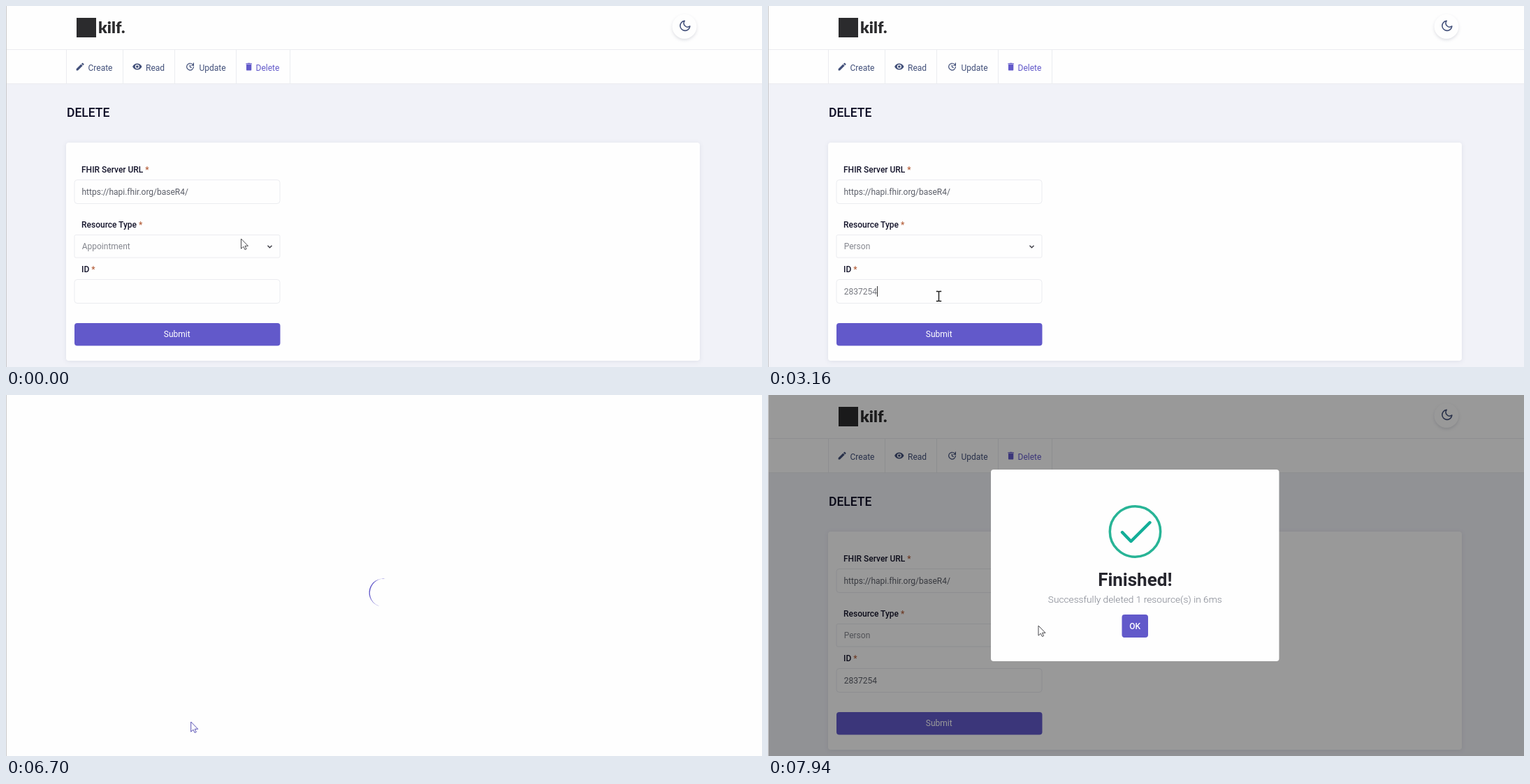
These frames come from a looping animation (1082x518 px, 8 s). An HTML page:

```html
<!DOCTYPE html>
<html lang="en">
<head>
<meta charset="utf-8">
<title>Delete resource</title>
<style>
html, body { margin: 0; width: 100%; height: 100%; overflow: hidden; background: #fefefe; }
svg { display: block; }
text { font: 12px Roboto, sans-serif; white-space: pre; }
.label { font-weight: 500; fill: #14142b; }
.star { fill: #b5603c; }
.value { fill: #5c5f69; }
.line { fill: none; stroke: #ebecf0; }
.field { fill: #fefefe; stroke: #ebecf0; }
.mid { text-anchor: middle; }
.nav { fill: #42507a; }
.accent { fill: #6259ca; }
.soft { filter: drop-shadow(0 1px 3px #2a305018); }
</style>
</head>
<body>
<svg id="stage" width="1082" height="518" viewBox="0 0 1082 518">
  <rect width="1082" height="518" fill="#fefefe"/>
  <rect y="111" width="1082" height="407" fill="#f1f2f8"/>
  <path class="line" d="M0 62.5H1082M0 111.5H1082M86.5 63V111M167.5 63V111M241.5 63V111M329.5 63V111M406.5 63V111"/>

  <rect x="101" y="17" width="28" height="28" fill="#2b2b2d"/>
  <text x="132" y="39" fill="#2b2b2d" style="font:900 23px Lato,sans-serif">kilf.</text>

  <circle cx="971" cy="29.5" r="17.5" fill="#fefefe" style="filter:drop-shadow(0 2px 2px #2a305026)"/>
  <path transform="translate(962.5 19) scale(.78)" fill="none" stroke="#42507a" stroke-width="2" stroke-linejoin="round"
    d="M21 12.79A9 9 0 1 1 11.21 3 7 7 0 0 0 21 12.79z"/>

  <g class="nav">
    <path transform="translate(98.8 79.8) scale(.61)" d="M20.7 7C21.1 6.65 21.1 6 20.7 5.6L18.4 3.3C18 2.9 17.35 2.9 17 3.3L15.1 5.1L18.9 8.9M3 17.25V21H6.75L17.8 9.9L14.1 6.2Z"/>
    <path transform="translate(180.5 79.7) scale(.61)" fill-rule="evenodd" d="M12 9a3 3 0 1 0 0 6a3 3 0 1 0 0-6M12 17a5 5 0 1 1 0-10a5 5 0 1 1 0 10M12 4.5C7 4.5 2.7 7.6 1 12C2.7 16.4 7 19.5 12 19.5C17 19.5 21.3 16.4 23 12C21.3 7.6 17 4.5 12 4.5Z"/>
    <path transform="translate(256.2 79.7) scale(.61)" fill="none" stroke="#42507a" stroke-width="2" d="M20 12.1A8 8 0 1 1 17.6 6.5L20 9V3M20 9.1H14.5M11.8 8V12.6L15.6 14.9"/>
    <text x="117.5" y="93">Create</text>
    <text x="200" y="93">Read</text>
    <text x="276.5" y="93">Update</text>
  </g>
  <g class="accent">
    <path transform="translate(340.3 79.8) scale(.61)" d="M19 4H15.5L14.5 3H9.5L8.5 4H5V6H19M6 19A2 2 0 0 0 8 21H16A2 2 0 0 0 18 19V7H6Z"/>
    <text x="357.5" y="93">Delete</text>
  </g>

  <text x="87" y="159" fill="#0c0c24" style="font-size:17.5px;font-weight:500">DELETE</text>
  <rect class="soft" x="86" y="196" width="907" height="313" rx="4" fill="#fefefe"/>
  <text class="label" x="108" y="239">FHIR Server URL <tspan class="star">*</tspan></text>
  <rect class="field" x="98" y="249.5" width="294" height="34" rx="4"/>
  <text class="value" x="108.5" y="270.5">https://hapi.fhir.org/baseR4/</text>
  <text class="label" x="108" y="318">Resource Type <tspan class="star">*</tspan></text>
  <rect class="field" x="98" y="328.5" width="294" height="32.5" rx="2"/>
  <text id="type" x="108.7" y="349.3"></text>
  <path d="M374.5 343.7l3 3 3-3" fill="none" stroke="#3a3a44" stroke-width="1.4"/>
  <text class="label" x="108" y="382">ID <tspan class="star">*</tspan></text>
  <rect class="field" x="98" y="392.5" width="294" height="34" rx="4"/>
  <text id="code" x="108.7" y="414"></text>
  <rect id="caret" y="402" width="1" height="15" fill="#333"/>
  <rect id="submit" class="accent" x="98" y="455" width="294.5" height="32.5" rx="4"/>
  <text class="mid" x="244.8" y="475" fill="#fff">Submit</text>

  <g id="popup">
    <rect x="97.5" y="24.5" width="295" height="304" fill="#fff" stroke="#c8c8cc" style="filter:drop-shadow(0 1px 2px #0003)"/>
    <svg x="98" y="25" width="294" height="303">
      <rect id="hover" width="284" height="15.15" fill="#1967d2"/>
      <g id="options"></g>
      <rect x="284" width="10" height="303" fill="#f1f1f1"/>
      <rect id="thumb" x="286" width="6" height="168" fill="#c1c1c1"/>
    </svg>
  </g>

  <g id="loading">
    <rect width="1082" height="518" fill="#fefefe"/>
    <path id="spinner" class="accent" d="M0-20A20 20 0 0 0 0 20A18.5 20 0 0 1 0-20Z"/>
  </g>

  <rect id="shade" width="1082" height="518"/>
  <g id="modal">
    <rect x="319" y="107" width="412.5" height="275" rx="4" fill="#fefefe"/>
    <circle cx="525.5" cy="196" r="36.2" fill="none" stroke="#28b496" stroke-width="3.5"/>
    <path id="check" d="M507 197L519.5 210L546.5 183" fill="none" stroke="#12ae98" stroke-width="4.4"
      stroke-linecap="round" stroke-linejoin="round" pathLength="1" stroke-dasharray="1 2"/>
    <text class="mid" x="525.3" y="274.3" fill="#26262e" style="font-size:26px;font-weight:700">Finished!</text>
    <text class="mid" x="525.3" y="297.7" fill="#7d818c" style="font-size:13.7px;font-weight:300">Successfully deleted 1 resource(s) in 6ms</text>
    <rect class="accent" x="506.5" y="315" width="37.5" height="33" rx="4"/>
    <text class="mid" x="525.2" y="336" fill="#fff" style="font-weight:500">OK</text>
  </g>

  <path id="arrow" d="M0 0V14.2L3.3 11.2L5.5 15.6L7.6 14.6L5.5 10.3H10Z" fill="#fefefe"/>
  <path id="beam" d="M-3.7-7H-1Q0-7 0-6Q0-7 1-7H3.7M0-6V6M-3.7 7H-1Q0 7 0 6Q0 7 1 7H3.7" fill="none" stroke="#1a1a1a" stroke-width="1.4"/>
  <rect width="1" height="518" fill="#c9c9cb"/>
</svg>
<script>
const LOOP = 8000, ROW = 15.15;
const el = {};
document.querySelectorAll('[id]').forEach(e => el[e.id] = e);
const set = (id, name, value) => el[id].setAttribute(name, value);
const show = (id, on) => set(id, 'visibility', on ? 'visible' : 'hidden');

const names = ('Appointment Bundle CarePlan CareTeam Claim Communication Composition Condition Consent Contract ' +
  'Coverage Device Encounter Endpoint Flag Goal Group HealthcareService ImagingStudy Immunization Invoice Library ' +
  'List Location Measure Media Medication Observation Organization Patient Person Practitioner Procedure ' +
  'Provenance Questionnaire Schedule').split(' ');
el.options.innerHTML = names.map((n, i) => `<text x="11" y="${i * ROW + 11.7}">${n}</text>`).join('');

const smooth = p => p * p * (3 - 2 * p);
const easeOut = p => 1 - (1 - p) ** 3;
const linear = p => p;

// Keys are [time, ...values]; returns the values eased between neighbours.
function track(t, keys, ease = smooth) {
  const i = keys.findIndex(k => k[0] > t);
  if (i === 0) return keys[0].slice(1);
  if (i < 0) return keys.at(-1).slice(1);
  const [a, b] = [keys[i - 1], keys[i]];
  const p = ease((t - a[0]) / (b[0] - a[0]));
  return a.slice(1).map((v, j) => v + (b[j + 1] - v) * p);
}

const pointer = [
  [30, 336.5, 334], [210, 335, 336], [470, 335, 336], [760, 319, 250], [1000, 317.5, 247], [1280, 317.5, 247],
  [1420, 295.5, 352], [1850, 268, 372], [2010, 268, 373], [2170, 250, 458], [2360, 244.5, 416.5],
  [3200, 244.5, 416.5], [3520, 264.7, 469], [7300, 264.7, 469], [7820, 387, 331]
];

function draw(t) {
  const [x, y] = track(t, pointer);

  const open = t >= 60 && t < 1190;
  show('popup', open);
  const [scroll] = track(t, [[560, 0], [1040, 16 * ROW]]);
  const slot = y < 328 ? Math.floor((y - 25 + scroll) / ROW) : 0;
  set('options', 'transform', `translate(0 ${-scroll})`);
  set('hover', 'y', slot * ROW - scroll);
  set('thumb', 'y', scroll / (16 * ROW) * 135);
  [...el.options.children].forEach((o, i) => o.setAttribute('fill', i === slot ? '#fff' : '#5c5f69'));

  el.type.textContent = t < 1190 ? 'Appointment' : 'Person';
  set('type', 'fill', t >= 30 && t < 2200 ? '#6c6e76' : '#85878f');
  const typed = t >= 2940;
  el.code.textContent = typed ? '2837254' : '';
  set('code', 'fill', t < 3520 ? '#777980' : '#5c5f69');
  show('caret', t >= 2210 && t < 2740 || typed && t < 3470);
  set('caret', 'x', typed ? 156 : 109);

  const overButton = y > 455 && t < 4200;
  el.submit.style.filter = overButton ? 'drop-shadow(0 6px 6px #6259ca50)' : '';

  const [veil] = track(t, [[3850, 0], [4150, 1], [6720, 1], [7120, 0]], linear);
  set('loading', 'opacity', veil);
  set('spinner', 'transform', `translate(539.5 283.5) rotate(${(t - 4410) / 750 * 360 - 5})`);

  set('shade', 'opacity', track(t, [[7160, 0], [7260, .4]], linear)[0]);
  const [scale] = track(t, [[7145, .7], [7275, 1.05], [7380, .95], [7445, 1]], easeOut);
  show('modal', t >= 7145);
  set('modal', 'transform', `translate(525.2 244.5) scale(${scale}) translate(-525.2 -244.5)`);
  const [drawn] = track(t, [[7545, 0], [7800, 1]]);
  show('check', drawn > 0);
  set('check', 'stroke-dashoffset', 1 - drawn);

  const inField = t > 1900 && t < 7000 && y > 392 && y < 428;
  show('beam', inField);
  show('arrow', !inField);
  for (const id of ['beam', 'arrow']) set(id, 'transform', `translate(${x} ${y})`);
  set('arrow', 'stroke', t > 3450 && t < 7350 ? '#5850b4' : '#4a4a4e');
}

function frame(now) {
  draw(now % LOOP);
  requestAnimationFrame(frame);
}
draw(0);
requestAnimationFrame(frame);
</script>
</body>
</html>
```
